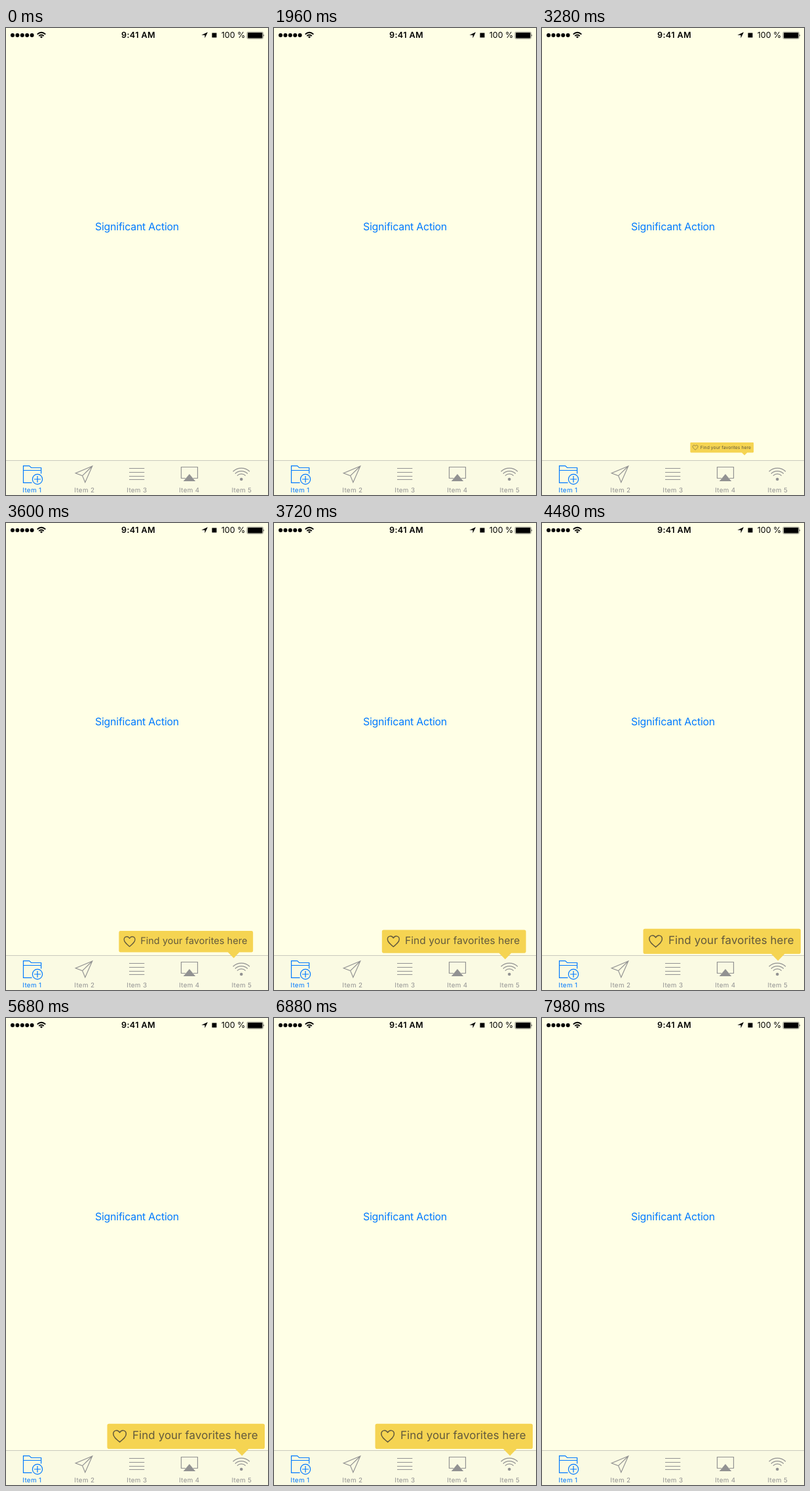
These frames come from a looping animation (400x711 px, 8 s). An HTML page:

```html
<!DOCTYPE html>
<html lang="en">
<head>
<meta charset="utf-8">
<title>Tab bar hint</title>
<style>
  html, body { margin: 0; width: 100%; height: 100%; overflow: hidden; background: #ffffe6; }
  svg { display: block; width: 400px; height: 711px; font-family: Inter, Roboto, sans-serif; }
  .icon { fill: none; stroke: currentColor; stroke-width: 1.2; }
  .solid { fill: currentColor; stroke: none; }
  .tab { color: #929292; }
  .tab.on { color: #007aff; }
  .tab text { fill: currentColor; font-size: 9.9px; letter-spacing: .3px; }
  text { text-rendering: geometricPrecision; }
</style>
</head>
<body>
<svg viewBox="0 0 400 711">
  <rect width="400" height="711" fill="#ffffe6"/>

  <g id="status">
    <g id="signal"></g>
    <g fill="none" stroke="#000" stroke-width="1.9">
      <path d="M47.7 9.6Q54 3.9 60.3 9.6M50.2 12.1Q54 8.7 57.8 12.1"/>
      <path d="M51.9 13.4Q54 11.8 56.1 13.4L54 15.6Z" fill="#000" stroke="none"/>
    </g>
    <text x="202" y="15.4" text-anchor="middle" font-size="12.6" font-weight="600" letter-spacing=".4">9:41 AM</text>
    <path d="M308 6.3L298.4 10.7H303.5V15.6Z"/>
    <rect x="314.5" y="7.5" width="7" height="7"/>
    <text x="328.7" y="15.4" font-size="12.5">100 %</text>
    <rect x="367.8" y="6" width="24.8" height="10.4" rx="2" fill="none" stroke="#8a8a80" stroke-width=".8"/>
    <rect x="369" y="7" width="22.5" height="8.5" rx="1"/>
    <path d="M393.3 9.4Q395 11.2 393.3 13Z"/>
  </g>

  <text x="200" y="308.2" text-anchor="middle" font-size="15.9" letter-spacing="-.22" fill="#007aff">Significant Action</text>

  <rect y="658" width="400" height="53" fill="#fafae3"/>
  <rect y="658" width="400" height="1" fill="#c9c9bd"/>

  <g class="tab on">
    <path class="icon" d="M39.5 692.3H26.5V666.6H35.5L38.6 669.5H53.6V678.5M26.5 673.5H53.6"/>
    <circle class="icon" cx="48" cy="687" r="7.6"/>
    <path class="icon" d="M43 687H53M48 682V692"/>
  </g>
  <g class="tab">
    <path class="icon" d="M131.8 667L106.3 677.8L116.6 681.6L120.8 691.8ZL116.6 681.6"/>
  </g>
  <g class="tab">
    <path class="icon" d="M188 670.5H211.3M188 676.5H211.3M188 682.5H211.3M188 687.5H211.3"/>
  </g>
  <g class="tab">
    <path class="icon" d="M274 685.5H267.5V668.5H292.5V685.5H286"/>
    <path class="solid" d="M280 679L289.2 690H270.8Z"/>
  </g>
  <g class="tab">
    <path class="icon" d="M346.6 675.3A18 18 0 0 1 372 675.3M349.8 678.5A13.5 13.5 0 0 1 368.8 678.5M352.9 681.6A9 9 0 0 1 365.7 681.6"/>
    <circle class="solid" cx="359.3" cy="687" r="2.3"/>
  </g>

  <g id="hint" visibility="hidden">
    <path fill="#f5d452" d="M157.3 617.7H392.2Q395 617.7 395 620.5V653.2Q395 656 392.2 656H370.5L360.3 666.4L350 656H157.3Q154.5 656 154.5 653.2V620.5Q154.5 617.7 157.3 617.7Z"/>
    <path fill="none" stroke="#62593d" stroke-width="1.5" stroke-linejoin="round" d="M173.6 645.6C168 641 163.8 637.6 163.8 633.2C163.8 627.5 170.8 626 173.6 631.2C176.4 626 183.4 627.5 183.4 633.2C183.4 637.6 179.2 641 173.6 645.6Z"/>
    <text x="193" y="641.3" font-size="16.9" letter-spacing=".1" fill="#62593d">Find your favorites here</text>
  </g>
</svg>
<script>
  const LOOP = 8000, SHOW = 3160, HIDE = 7240, GROW = 1100;
  const RATE = 4.2;               // decay per second of the remaining size
  const CX = 274.75, CY = 640;    // point the hint grows from
  const NS = 'http://www.w3.org/2000/svg';

  function add(parent, tag, attrs, text = '') {
    const el = document.createElementNS(NS, tag);
    for (const key in attrs) el.setAttribute(key, attrs[key]);
    el.textContent = text;
    parent.append(el);
  }

  const signal = document.getElementById('signal');
  for (let i = 0; i < 5; i++) add(signal, 'circle', { cx: 10 + i * 7.4, cy: 11, r: 3 });

  document.querySelectorAll('.tab').forEach((tab, i) =>
    add(tab, 'text', { x: 39.8 + i * 80, y: 707.2, 'text-anchor': 'middle' }, `Item ${i + 1}`));

  function size(ms) {
    const end = Math.exp(-RATE * GROW / 1000);
    const left = Math.exp(-RATE * Math.min(ms, GROW) / 1000);
    return 1 - (left - end) / (1 - end);
  }

  const hint = document.getElementById('hint');
  const start = performance.now();

  function draw() {
    const t = (performance.now() - start) % LOOP;
    const shown = t >= SHOW && t < HIDE;
    hint.setAttribute('visibility', shown ? 'visible' : 'hidden');
    if (shown) {
      const s = size(t - SHOW);
      hint.setAttribute('transform', `translate(${CX} ${CY}) scale(${s}) translate(${-CX} ${-CY})`);
    }
    requestAnimationFrame(draw);
  }
  draw();
</script>
</body>
</html>
```
